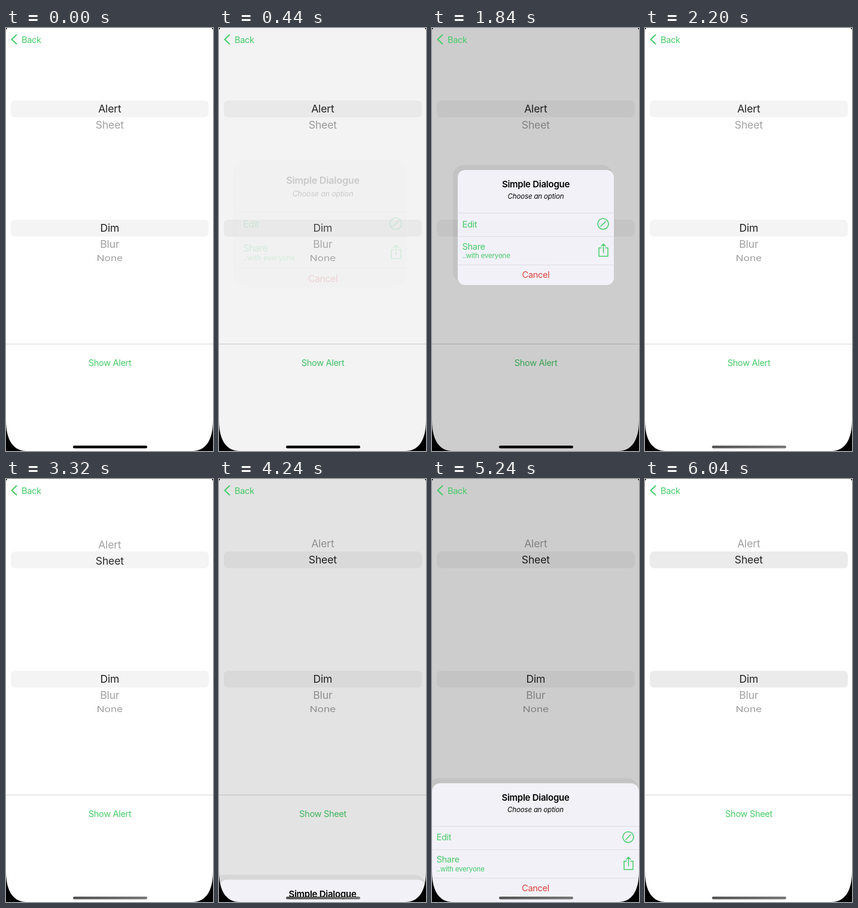
Write an HTML page with a canvas that moves like this. It is 346 px wide and 706 px high and loops after 6.8 s.

```html
<!DOCTYPE html>
<html lang="en">
<head>
<meta charset="utf-8">
<title>Dialogue demo</title>
<style>
  html, body { margin: 0; width: 100%; height: 100%; overflow: hidden; background: #fff; }
  canvas { display: block; width: 346px; height: 706px; }
</style>
</head>
<body>
<canvas width="346" height="706"></canvas>
<script>
const W = 346, H = 706, LOOP = 6800, STEP = 40;
const GREEN = '#46cb68', CARD = '#f2f1f8', LINE = '#dcdce1';
const ctx = document.querySelector('canvas').getContext('2d');

const clamp = v => Math.min(1, Math.max(0, v));
const mix = (a, b, p) => a + (b - a) * p;
const ramp = (t, from, to) => clamp((t - from) / (to - from));
const smooth = p => p * p * (3 - 2 * p);
const easeOut = p => 1 - (1 - p) ** 3;
const gray = v => `rgb(${v},${v},${v})`;

// Critically damped spring, 0 to 1
function spring(t, start) {
  const x = Math.max(0, t - start) * 0.018;
  return 1 - (1 + x) * Math.exp(-x);
}

function text(str, x, y, { size = 14.7, color = GREEN, style = '', align = 'center', gap = -0.4, squash = 1 } = {}) {
  ctx.save();
  ctx.translate(x, y);
  ctx.scale(1, squash);
  ctx.font = `${style} ${size}px Inter, sans-serif`;
  ctx.letterSpacing = gap + 'px';
  ctx.textAlign = align;
  ctx.fillStyle = color;
  ctx.fillText(str, 0, size * 0.36);
  ctx.restore();
}

function box(x, y, w, h, radius, color) {
  ctx.fillStyle = color;
  ctx.beginPath();
  ctx.roundRect(x, y, w, h, radius);
  ctx.fill();
}

function stroke(path, width, x = 0, y = 0) {
  ctx.save();
  ctx.translate(x, y);
  ctx.strokeStyle = GREEN;
  ctx.lineWidth = width;
  ctx.lineCap = ctx.lineJoin = 'round';
  ctx.stroke(new Path2D(path));
  ctx.restore();
}

function pickerRow(str, y, center) {
  const d = Math.abs(y - center);
  const shade = Math.round(mix(35, 160, clamp(d / 24)));
  text(str, 173.3, y, { size: 17.6, color: gray(shade), gap: -0.2, squash: d > 40 ? 0.78 : 1 - d / 700 });
}

function page(t) {
  const scroll = 26.7 * easeOut(ramp(t, 3120, 3440));
  const band = t >= 6000 ? '#ebebeb' : '#f4f4f4';
  ctx.fillStyle = '#fff';
  ctx.fillRect(0, 0, W, H);
  box(8, 121, 331, 28, 7, band);
  box(8, 320, 331, 28, 7, band);
  pickerRow('Alert', 134.8 - scroll, 134.8);
  pickerRow('Sheet', 161.5 - scroll, 134.8);
  pickerRow('Dim', 334, 334);
  pickerRow('Blur', 360.7, 334);
  pickerRow('None', 383.7, 334);
  ctx.fillStyle = '#d6d6d6';
  ctx.fillRect(0, 527, W, 1);
  text(t < 3400 ? 'Show Alert' : 'Show Sheet', 173.5, 558.5);
}

function dialogue(x, y, w, h, radius) {
  const mid = x + w / 2, left = x + 7.5, icon = x + w - 18;
  box(x - 8, y - 8.5, w + 7, h + 5, 19, 'rgba(0,0,0,.05)');
  box(x, y, w, h, radius, CARD);
  ctx.fillStyle = LINE;
  for (const dy of [72, 111, 158.5]) ctx.fillRect(x, y + dy - 0.5, w, 1);
  text('Simple Dialogue', mid, y + 23.5, { size: 15, style: '600', color: '#000', gap: -0.25 });
  text('Choose an option', mid, y + 44, { size: 11.5, style: 'italic', color: '#000', gap: -0.15 });
  text('Edit', left, y + 90.3, { align: 'left' });
  text('Share', left, y + 127.3, { align: 'left' });
  text('..with everyone', left, y + 142.7, { size: 11.5, align: 'left', gap: -0.2 });
  text('Cancel', mid, y + 175, { color: '#d9443c' });
  stroke('M9 0A9 9 0 1 1 -9 0A9 9 0 1 1 9 0M-4 4L4 -4', 1.5, icon, y + 90);
  stroke('M-3.5 -4H-7.5V10H7.5V-4H3.5M0 4V-10.5M-3.5 -7L0 -10.5L3.5 -7', 1.5, icon + 0.5, y + 134);
}

function alertBox(t) {
  const shown = smooth(ramp(t, 330, 760)), hidden = smooth(ramp(t, 1820, 2180));
  const alpha = shown * (1 - hidden);
  if (!alpha) return;
  const scale = mix(1.1, 1, shown);
  ctx.save();
  ctx.globalAlpha = alpha;
  ctx.translate(173.5, 333);
  ctx.scale(scale, scale);
  ctx.translate(-173.5, -333);
  dialogue(43, 237, 261, 192, 12);
  ctx.restore();
}

function sheet(t) {
  const y = 507.7 + 683 * (1 - spring(t, 4086) + spring(t, 5700));
  if (y < H + 10) dialogue(0, y, W, 240, [14, 14, 0, 0]);
}

function deviceFrame(t) {
  let bar = '#000';
  if (t >= 1880) {
    bar = ctx.createLinearGradient(112, 0, 236, 0);
    bar.addColorStop(0, '#555');
    bar.addColorStop(1, '#777');
  }
  box(112, 697, 124, 4.5, 2.25, bar);
  ctx.fillStyle = '#000';
  for (const side of [1, -1]) {
    ctx.save();
    if (side < 0) ctx.transform(-1, 0, 0, 1, W, 0);
    ctx.fill(new Path2D('M0 655C0 690 14 706 34 706H0ZM0 0H2L0 3Z'));
    ctx.restore();
  }
}

function draw(now) {
  const t = Math.floor(now % LOOP / STEP) * STEP;
  page(t);
  const dim = smooth(ramp(t, 330, 680)) - smooth(ramp(t, 1820, 2180))
            + smooth(ramp(t, 4050, 4400)) - smooth(ramp(t, 5700, 6040));
  ctx.fillStyle = `rgba(0,0,0,${0.197 * clamp(dim)})`;
  ctx.fillRect(0, 0, W, H);
  stroke('M17.5 11.5L9.5 19L17.5 26.5', 2);
  text('Back', 26, 19.3, { align: 'left' });
  alertBox(t);
  sheet(t);
  deviceFrame(t);
}

const start = performance.now();
function tick() {
  draw(performance.now() - start);
  requestAnimationFrame(tick);
}
tick();
</script>
</body>
</html>
```
